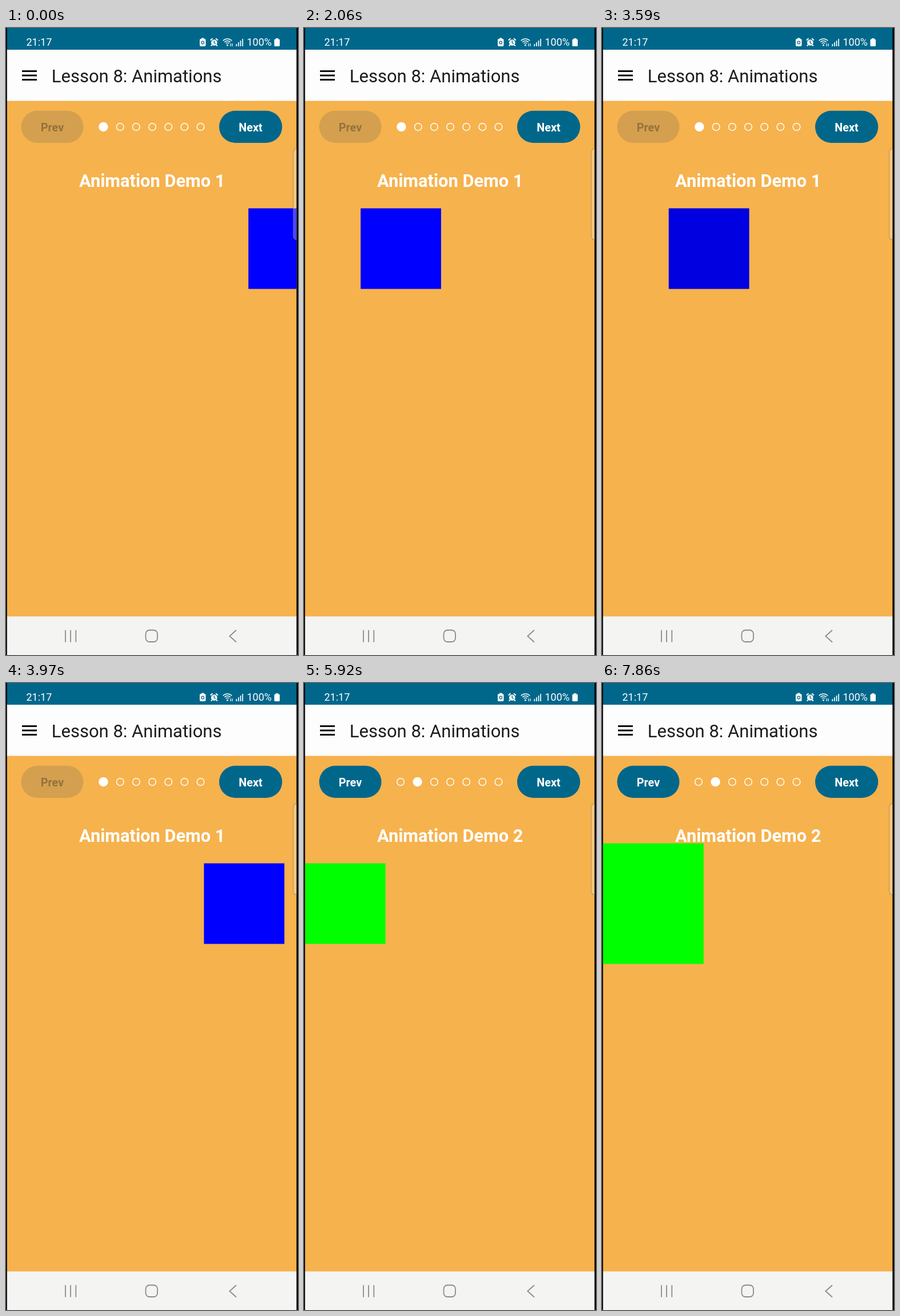
Recreate the animation shown at these times as an HTML page with a canvas. Size 511x1097 px, loop 8 s.

```html
<!DOCTYPE html>
<html lang="en">
<head>
<meta charset="utf-8">
<title>Animation demos</title>
<style>
  html, body { margin: 0; width: 100%; height: 100%; overflow: hidden; background: #000; }
  canvas { display: block; }
</style>
</head>
<body>
<canvas id="stage" width="511" height="1097"></canvas>
<script>
const ctx = document.getElementById('stage').getContext('2d');
const LOOP = 8000, DP = 1.408, BOX = 100 * DP;
const LEFT = 1.8, WIDTH = 506.6;
const PAGE_TURN = 4880;
const TEAL = '#00678b', ORANGE = '#f6b24d';

const clamp = v => Math.min(1, Math.max(0, v));

// Cubic bezier (0.42, 0, 1, 1), solved by bisection
function easeIn(x) {
  let lo = 0, hi = 1;
  for (let i = 0; i < 24; i++) {
    const s = (lo + hi) / 2;
    if (1.26 * s * (1 - s) ** 2 + 3 * s * s * (1 - s) + s ** 3 < x) lo = s; else hi = s;
  }
  return 3 * lo * lo - 2 * lo ** 3;
}
const easeInOut = p => p < 0.5 ? easeIn(2 * p) / 2 : 1 - easeIn(2 - 2 * p) / 2;
const tween = (t, start) => easeInOut(clamp((t - start) / 1000));

function rect(x, y, w, h, color) {
  ctx.fillStyle = color;
  ctx.fillRect(x, y, w, h);
}
function roundRect(x, y, w, h, r) {
  ctx.beginPath();
  ctx.roundRect(x, y, w, h, r);
}
function fill(color) { ctx.fillStyle = color; ctx.fill(); }
function stroke(color, width) { ctx.strokeStyle = color; ctx.lineWidth = width; ctx.stroke(); }
function circle(x, y, r) {
  ctx.beginPath();
  ctx.arc(x, y, r, 0, 7);
}
function lines(color, width, ...paths) {
  ctx.beginPath();
  for (const [x, y, ...rest] of paths) {
    ctx.moveTo(x, y);
    for (let i = 0; i < rest.length; i += 2) ctx.lineTo(rest[i], rest[i + 1]);
  }
  stroke(color, width);
}
function text(str, x, y, font, color, align = 'left') {
  ctx.font = font + ' Roboto, sans-serif';
  ctx.textAlign = align;
  ctx.fillStyle = color;
  ctx.fillText(str, x, y);
}

// Touch ripple: grows for 450 ms, then fades for 375 ms
function ripple(t, press, x, y, radius, rgb) {
  const age = t - press;
  if (age < 0 || age > 825) return;
  const grow = 1 - (1 - clamp(age / 450)) ** 2;
  const alpha = 0.12 * clamp(age / 80) * (1 - clamp((age - 450) / 375));
  circle(x, y, radius * (0.3 + 0.7 * grow));
  fill(`rgba(${rgb},${alpha})`);
}
function clipped(draw) {
  ctx.save();
  ctx.clip();
  draw();
  ctx.restore();
}

function statusBar() {
  const white = '#fff';
  rect(0, 0, 511, 38, TEAL);
  text('21:17', 35.5, 31, '18px', white);
  text('100%', 421.5, 31, '18px', white);

  // Battery saver
  roundRect(339, 19, 10.5, 13, 2);
  fill(white);
  rect(342, 17.5, 4.5, 2, white);
  circle(344.2, 25.5, 2.4);
  stroke(TEAL, 1.2);

  // Alarm clock
  circle(364.3, 25.5, 5.3);
  fill(white);
  lines(white, 2, [357.8, 21.5, 361.5, 18.3], [370.8, 21.5, 367.1, 18.3],
    [360.5, 29.5, 358.8, 31.5], [368.1, 29.5, 369.8, 31.5]);
  lines(TEAL, 1.3, [364.3, 22, 364.3, 26, 367, 27.5]);

  // Wi-Fi
  for (const r of [4, 7.5, 11]) {
    ctx.beginPath();
    ctx.arc(387.5, 30, r, -2.36, -0.78);
    stroke(white, 1.3);
  }
  circle(387.5, 30, 1.6);
  fill(white);
  lines(white, 1.2, [393, 27, 393, 32], [396, 27, 396, 32]);

  // Signal and battery
  for (let i = 0; i < 4; i++) rect(402.5 + 3.6 * i, 28 - 3 * i, 1.7, 4 + 3 * i, white);
  roundRect(469.5, 19.5, 9.5, 12.5, 1.5);
  fill(white);
  rect(472, 18, 4.5, 2, white);
}

function titleBar() {
  rect(0, 38, 511, 89.5, '#fdfdfd');
  lines('#0c0c0e', 3, [28, 75.5, 54, 75.5], [28, 83, 54, 83], [28, 90.5, 54, 90.5]);
  text('Lesson 8: Animations', 79.8, 95, '31px', '#1b1b1f');
}

function pager(t, page) {
  roundRect(26.5, 144.8, 109, 56.2, 28.1);
  fill(page ? TEAL : '#d4a04f');
  text('Prev', 81, 181, 'bold 19.8px', page ? '#fff' : '#94723d', 'center');

  roundRect(373, 144.8, 110.3, 56.2, 28.1);
  fill(TEAL);
  clipped(() => ripple(t, 4800, 431.5, 173, 62, '255,255,255'));
  text('Next', 428, 181, 'bold 19.8px', '#fff', 'center');

  for (let i = 0; i < 7; i++) {
    const x = (i < page ? 169 : 171.6) + 28.15 * i;
    if (i === page) {
      circle(170.4 + 28.15 * i, 173, 8.2);
      fill('#fff');
    } else {
      circle(x, 173, 6.3);
      stroke('#fff', 1.5);
    }
  }
}

function square(t, page) {
  const x = page ? 0 : 300 * DP * (1 - tween(t, 1374) + tween(t, 3245));
  const scale = page ? 1 + 0.5 * tween(t, 6437) : 1;
  ctx.save();
  ctx.translate(LEFT + x + BOX / 2, 386);
  ctx.scale(scale, scale);
  ctx.beginPath();
  ctx.rect(-BOX / 2, -BOX / 2, BOX, BOX);
  fill(page ? '#0f0' : '#00f');
  clipped(() => {
    for (const press of page ? [6340] : [1080, 3130]) ripple(t, press, 0, 0, BOX * 0.72, '0,0,0');
  });
  ctx.restore();
}

function edgeHandle() {
  roundRect(502.8, 211, 14, 159.5, 6);
  fill('rgba(255,255,255,.28)');
  stroke('rgba(140,120,90,.6)', 1.1);
}

function navBar() {
  const gray = '#8b8b8b';
  rect(0, 1029.5, 511, 68, '#f4f4f3');
  lines(gray, 1.8, [104, 1053.5, 104, 1074.5], [113, 1053.5, 113, 1074.5], [122.3, 1053.5, 122.3, 1074.5]);
  roundRect(244.5, 1053.5, 20.5, 20.5, 6.5);
  stroke(gray, 1.8);
  lines(gray, 1.8, [403, 1053.5, 391.3, 1064, 403, 1074.5]);
}

function draw(t) {
  const page = t < PAGE_TURN ? 0 : 1;
  rect(0, 0, 511, 1097, '#000');
  ctx.beginPath();
  ctx.rect(LEFT, 0, WIDTH, 1097);
  clipped(() => {
    rect(0, 127, 511, 903, ORANGE);
    statusBar();
    titleBar();
    pager(t, page);
    text('Animation Demo ' + (page + 1), 255.7, 278, 'bold 30.8px', '#fff', 'center');
    square(t, page);
    edgeHandle();
    navBar();
  });
}

function tick() {
  draw(performance.now() % LOOP);
  requestAnimationFrame(tick);
}
tick();
</script>
</body>
</html>
```
